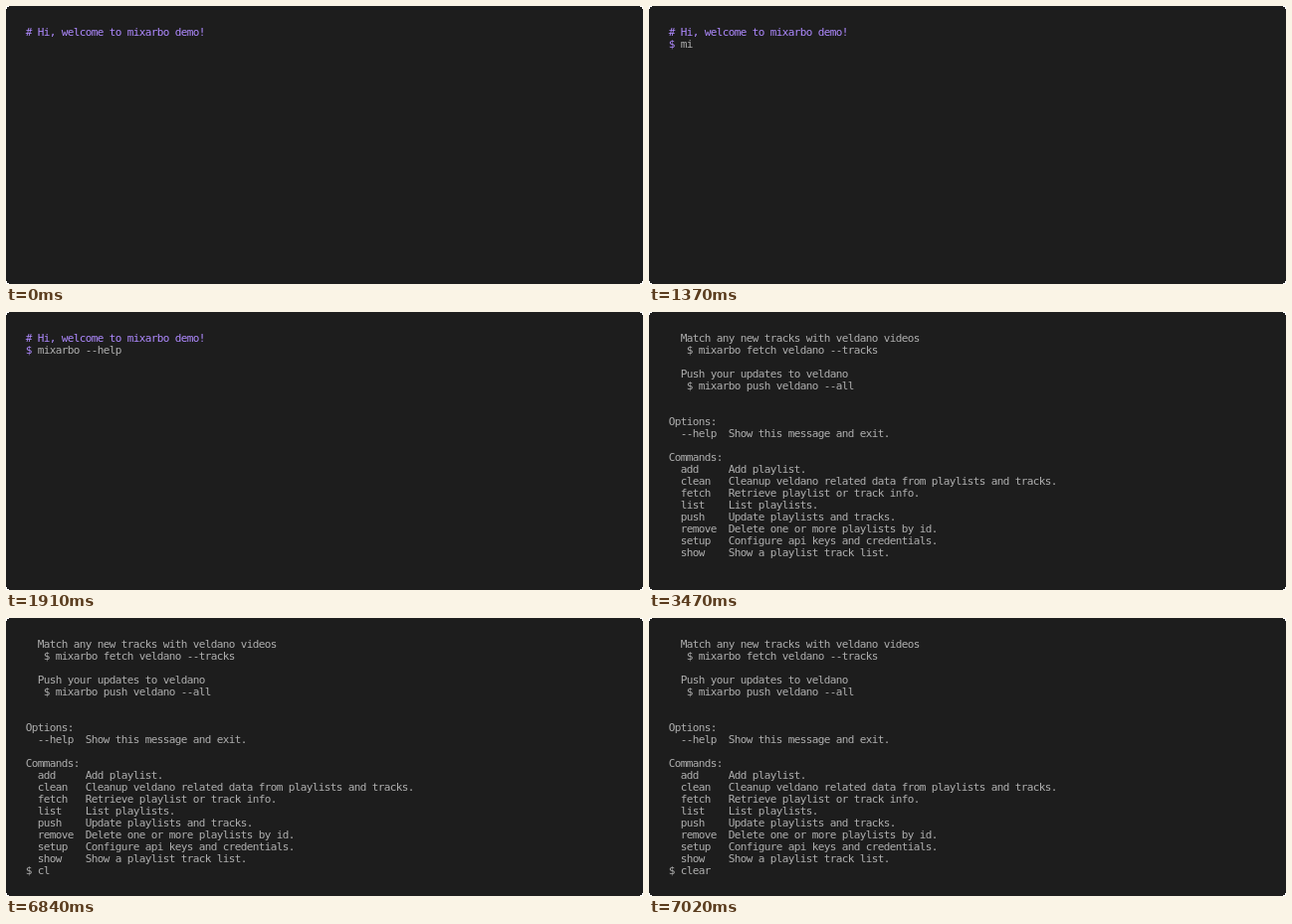
Recreate the animation shown at these times as an HTML page. Size 640 by 280 pixels, loop 8 s.

```html
<!DOCTYPE html>
<html lang="en">
<head>
<meta charset="utf-8">
<title>Terminal demo</title>
<style>
  html, body { margin: 0; width: 100%; height: 100%; overflow: hidden; background: #fff; }
  svg { display: block; width: 640px; height: 280px; }
  text {
    font: 11px "DejaVu Sans Mono", monospace;
    letter-spacing: -0.6224px; /* 6px cells */
    white-space: pre;
    fill: #afafaf;
  }
  .accent { fill: #ae89fe; }
</style>
</head>
<body>
<svg viewBox="0 0 640 280">
  <rect width="640" height="280" rx="5" fill="#1d1d1d" shape-rendering="crispEdges"/>
  <g id="intro"></g>
  <g id="help"></g>
</svg>
<script>
const LOOP = 8000, HELP_AT = 3470, STEP = 90;
const LEFT = 19.7, TOP = 30, CELL = 6, ROW = 12; // LEFT centres glyphs in their cells

const intro = document.getElementById('intro');
const help = document.getElementById('help');

const HELP = [
  '  Match any new tracks with veldano videos',
  '   $ mixarbo fetch veldano --tracks',
  '',
  '  Push your updates to veldano',
  '   $ mixarbo push veldano --all',
  '',
  '',
  'Options:',
  '  --help  Show this message and exit.',
  '',
  'Commands:',
  '  add     Add playlist.',
  '  clean   Cleanup veldano related data from playlists and tracks.',
  '  fetch   Retrieve playlist or track info.',
  '  list    List playlists.',
  '  push    Update playlists and tracks.',
  '  remove  Delete one or more playlists by id.',
  '  setup   Configure api keys and credentials.',
  '  show    Show a playlist track list.'
];

function line(parent, col, row, str, cls = '') {
  const el = document.createElementNS('http://www.w3.org/2000/svg', 'text');
  el.setAttribute('x', LEFT + col * CELL);
  el.setAttribute('y', TOP + row * ROW);
  el.setAttribute('class', cls);
  el.textContent = str;
  parent.append(el);
  return el;
}

function prompt(parent, row, shownAt, typedAt, command, cls) {
  return {
    sign: line(parent, 0, row, '$', cls),
    input: line(parent, 2, row, ''),
    shownAt, typedAt, command
  };
}

line(intro, 0, 0, '# Hi, welcome to mixarbo demo!', 'accent');
HELP.forEach((str, row) => {
  // place each line by its first visible cell
  const text = str.trimStart();
  if (text) line(help, str.length - text.length, row, text);
});

const prompts = [
  prompt(intro, 1, 100, 1370, 'mixarbo --help', 'accent'),
  prompt(help, 19, 5560, 6840, 'clear')
];

const show = (el, on) => el.setAttribute('visibility', on ? 'inherit' : 'hidden');

function draw(t) {
  show(intro, t < HELP_AT);
  show(help, t >= HELP_AT);
  for (const p of prompts) {
    show(p.sign, t >= p.shownAt);
    // two keys land per step
    const count = t < p.typedAt ? 0 : 2 * (Math.floor((t - p.typedAt) / STEP) + 1);
    const typed = p.command.slice(0, count);
    if (p.input.textContent !== typed) p.input.textContent = typed;
  }
}

const start = performance.now();
function tick() {
  draw((performance.now() - start) % LOOP);
  requestAnimationFrame(tick);
}
draw(0);
requestAnimationFrame(tick);
</script>
</body>
</html>
```
